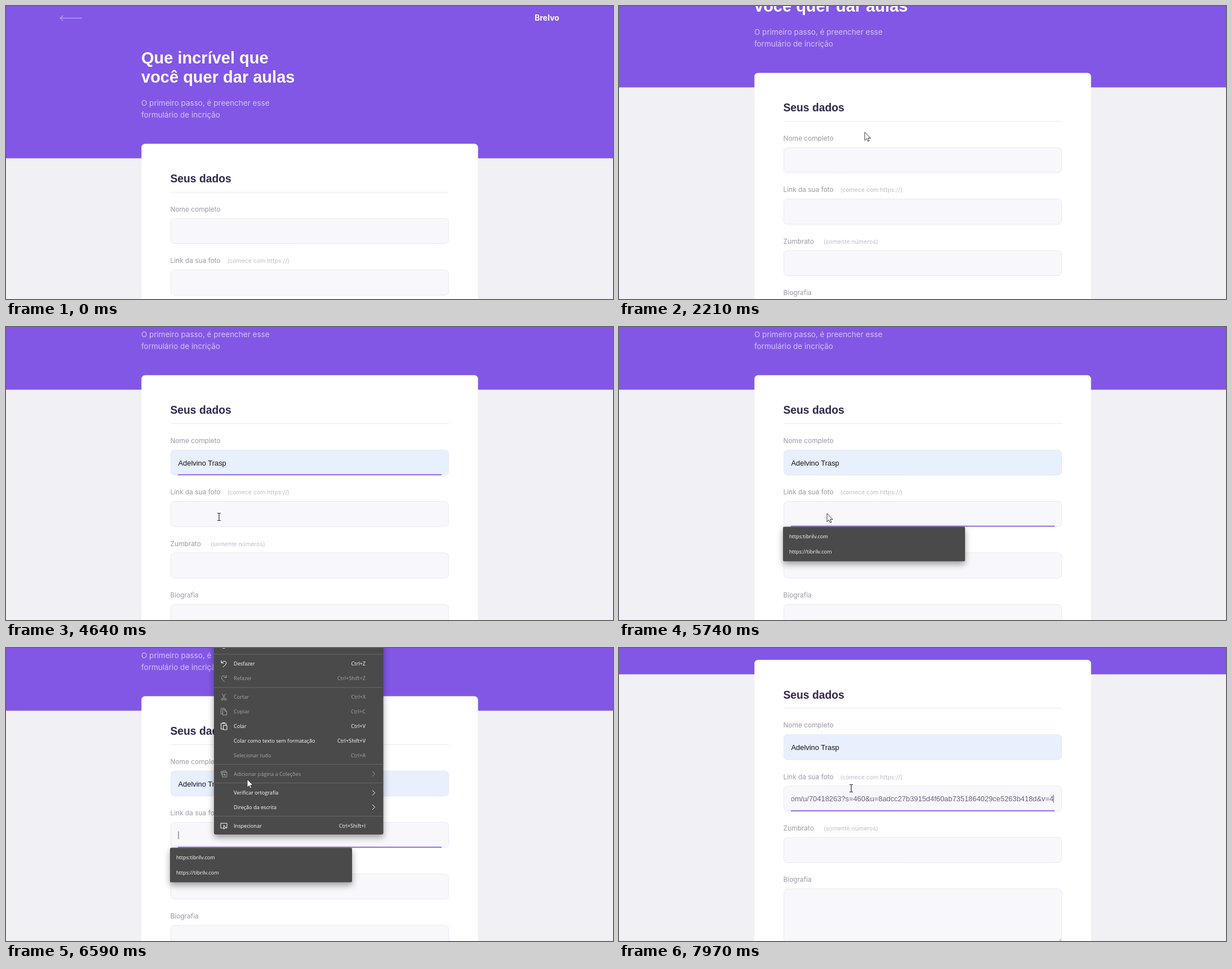
Write an HTML page that moves like this. It is 1077 px wide and 520 px high and loops after 8 s.

```html
<!DOCTYPE html>
<html lang="pt-BR">
<head>
<meta charset="utf-8">
<title>Formulário de inscrição</title>
<style>
  html, body { margin: 0; width: 100%; height: 100%; overflow: hidden; background: #f0f0f5; }
  svg { display: block; width: 100%; height: 100%; }
  text { white-space: pre; }
  .title { font: bold 29px "Liberation Sans", Arial, sans-serif; fill: #fff; }
  .legend { font: bold 19.3px "Liberation Sans", Arial, sans-serif; fill: #32264d; }
  .lead { font: 13.5px Inter, sans-serif; fill: #d4c2ff; }
  .brand { font: bold 14px Inter, sans-serif; fill: #fff; }
  .label { font: 11.9px Inter, sans-serif; fill: #9c98a6; }
  .hint { font: 10.5px Inter, sans-serif; fill: #c1bccc; }
  .value { font: 12.9px "Liberation Sans", Arial, sans-serif; fill: #6a6180; }
  .ui { font: 500 9.15px "Open Sans", "Noto Sans", sans-serif; fill: #fff; }
  .off { opacity: .5; }
  .box { fill: #f8f8fc; stroke: #e6e6f0; stroke-width: .9; }
  .line { fill: none; stroke: #fff; stroke-width: 1; }
  .pop { filter: drop-shadow(0 5px 6px rgba(0, 0, 0, .38)); }
</style>
</head>
<body>
<svg id="stage" viewBox="0 0 1077 520"></svg>
<script>
const LOOP = 8000;
const NAME = 'Adelvino Trasp';
const SCHEME = 'https:', SLASHES = '/'.repeat(2);
const LINK = 'com/u/70418263?s=460&amp;u=8adcc27b3915d4f60ab7351864029ce5263b418d&amp;v=4';
const FIELD_TOP = [377.3, 468.6, 559.9, 651.2];

const text = (cls, x, y, str, extra = '') => `<text class="${cls}" x="${x}" y="${y}" ${extra}>${str}</text>`;
const rect = (x, y, w, h, extra = '') => `<rect x="${x}" y="${y}" width="${w}" height="${h}" ${extra}/>`;

function field(i, label, hint = '', hintX = 0, height = 44.5) {
  const y = FIELD_TOP[i];
  return text('label', 291.5, y - 12.3, label) + text('hint', hintX, y - 12.3, hint) +
    rect(292.4, y, 493, height, `id="box${i}" class="box" rx="6.4"`);
}

const focusLine = i => rect(305, FIELD_TOP[i] + 43.1, 468, 1.7, `id="focus${i}" fill="#8257e5"`);

function dropdown(id, y, height, items) {
  return `<g id="${id}">` + rect(291, y, 323, height, 'class="pop" rx="2" fill="#4a4a4a"') +
    (id === 'names' ? rect(292, y + 3, 321, 27, 'id="nameHover" fill="#616161"') : '') +
    items.map((s, i) => text('ui', 302, y + 20.4 + i * 27.5, s)).join('') + '</g>';
}

// Context menu rows: centre y, label, shortcut ('>' opens a submenu), enabled, icon
const ROWS = [
  [-5, 'Emoji', '', 1, 'M5.5 0A5.5 5.5 0 1 1-5.5 0A5.5 5.5 0 1 1 5.5 0M-2.5 1.5Q0 4 2.5 1.5'],
  [28, 'Desfazer', 'Ctrl+Z', 1, 'M-4.5-6V-1.5H0M-4.5-1.5Q-1-6 2.5-4.5Q6-2 3.5 1L-1.5 6'],
  [54, 'Refazer', 'Ctrl+Shift+Z', 0, 'M4.5-6V-1.5H0M4.5-1.5Q1-6-2.5-4.5Q-6-2-3.5 1L1.5 6'],
  [87, 'Cortar', 'Ctrl+X', 0, 'M-3-6L2 3M3-6L-2 3M-1 4a1.7 1.7 0 1 1-3.4 0a1.7 1.7 0 1 1 3.4 0M4.4 4a1.7 1.7 0 1 1-3.4 0a1.7 1.7 0 1 1 3.4 0'],
  [113, 'Copiar', 'Ctrl+C', 0, 'M-2-4H2L5-1V6H-2ZM2-4V-1H5M-2 4H-5V-6H1L2.5-4'],
  [139, 'Colar', 'Ctrl+V', 1, 'M-1 5H-5V-5H4V-2M-2-5V-6.5H1.5V-5M-1-1.5H5.5V6H-1Z'],
  [165, 'Colar como texto sem formatação', 'Ctrl+Shift+V', 1, ''],
  [190.5, 'Selecionar tudo', 'Ctrl+A', 0, ''],
  [223.5, 'Adicionar página a Coleções', '>', 0, 'M-2.5-3H5.5V5.5H-2.5ZM1.5-1V3.5M-.7 1.2H3.7M-3 3L-5.5-4L3-6L3.6-3'],
  [257, 'Verificar ortografia', '>', 1, ''],
  [282.5, 'Direção da escrita', '>', 1, ''],
  [315.5, 'Inspecionar', 'Ctrl+Shift+I', 1, 'M-1 4H-5.5V-4.5H5.5V3.5H4M0-1V6L2 4H4.5Z']
];

function menuRow([y, label, key, on, icon]) {
  const side = key === '>'
    ? `<path class="line" d="M650 ${y - 4.5}l4.5 4.5l-4.5 4.5"/>`
    : text('ui', 638, y + 3.3, key, 'text-anchor="end"');
  return `<g class="${on ? '' : 'off'}">${text('ui', 404, y + 3.3, label)}${side}
    <path class="line" transform="translate(386.5 ${y})" d="${icon}"/></g>`;
}

const menu = `<g id="menu">${rect(369, -60, 300.5, 391, 'class="pop" rx="3" fill="#4a4a4a"')}
  ${rect(369, 0, 300.5, 26, 'id="rowHover" fill="#616161"')}
  ${[11, 70, 206.5, 239.5, 298.5].map(y => rect(369, y - .5, 300.5, 1, 'fill="#686868"')).join('')}
  ${ROWS.map(menuRow).join('')}</g>`;

document.getElementById('stage').innerHTML = `
  <clipPath id="inside">${rect(305.5, 460, 467, 60)}</clipPath>
  ${rect(0, 0, 1077, 520, 'fill="#f0f0f5"')}
  <g id="page">
    ${rect(0, 0, 1077, 270.3, 'fill="#8257e5"')}
    <path d="M134.5 21.5H96.5M101 17l-4.7 4.5l4.7 4.5" fill="none" stroke="#b79bf3" stroke-width="1.5"/>
    ${text('brand', 938, 25.5, 'Brelvo')}
    ${text('title', 240, 102, 'Que incrível que')}
    ${text('title', 240, 136, 'você quer dar aulas')}
    ${text('lead', 240, 177, 'O primeiro passo, é preencher esse')}
    ${text('lead', 240, 198, 'formulário de incrição')}
    ${rect(240.3, 244.6, 597.2, 900, 'rx="6.4" fill="#fff"')}
    ${text('legend', 291.5, 313.3, 'Seus dados')}
    ${rect(292, 330, 494, .9, 'fill="#e6e6f0"')}
    ${field(0, 'Nome completo')}
    ${field(1, 'Link da sua foto', `(comece com ${SCHEME}${SLASHES})`, 392.5)}
    ${field(2, 'Zumbrato', '(somente números)', 363)}
    ${field(3, 'Biografia', '', 0, 95)}
    <path d="M779.5 745l5-5M782.5 745l2-2" stroke="#777" stroke-width=".8"/>
    ${focusLine(0)}${focusLine(1)}
    ${text('value', 305.5, 404.6, NAME, 'id="name" style="fill:#111"')}
    <g id="link" clip-path="url(#inside)">${text('value', 771, 495.9, LINK, 'text-anchor="end"')}</g>
    ${rect(0, 0, 1, 14, 'id="caret" fill="#5a5170"')}
  </g>
  ${dropdown('names', 263.5, 33.5, [NAME])}
  ${dropdown('links', 354.5, 61.3, [SCHEME + 'tibrilv.com', SCHEME + SLASHES + 'tibrilv.com'])}
  ${menu}
  <path id="arrow" d="M0 0V14.5L3.4 11.3L5.7 16.3L7.9 15.3L5.7 10.5H10.2Z" fill="#fff" stroke="#222" stroke-width=".9"/>
  <path id="beam" d="M-3-6.5H-.8L0-6L.8-6.5H3M0-6V6M-3 6.5H-.8L0 6L.8 6.5H3" fill="none" stroke="#222" stroke-width="1.1"/>`;

const el = {};
document.querySelectorAll('[id]').forEach(n => el[n.id] = n);
const show = (id, on) => el[id].setAttribute('visibility', on ? 'visible' : 'hidden');
const move = (id, x, y) => el[id].setAttribute('transform', `translate(${x} ${y})`);
const within = (t, a, b) => t >= a && t < b;

// [time, scroll offset]
const SCROLL = [[0, 0], [1840, 46], [1920, 79.5], [2210, 125.9], [2290, 159], [7890, 190], [7970, 223.6]];

// [time, x, y, pointer shape]
const POINTER = [
  [630, 642, 408, 'arrow'], [780, 560, 340, 'arrow'], [930, 474, 260, 'arrow'], [1080, 436, 224, 'arrow'],
  [2655, 436, 224, 'arrow'], [2660, 431, 240, 'beam'], [2720, 428, 250, 'beam'],
  [2945, 428, 250, 'beam'], [2950, 420, 249, 'beam'], [3050, 424, 254, 'beam'],
  [3725, 424, 254, 'beam'], [3735, 415, 264, 'arrow'], [3960, 371, 275, 'arrow'],
  [4170, 371, 275, 'arrow'], [4320, 374, 300, 'arrow'], [4400, 377, 325, 'beam'], [4470, 378, 335, 'beam'],
  [4640, 378, 337, 'beam'], [4800, 378, 337, 'beam'], [5030, 373, 331, 'beam'],
  [5585, 373, 331, 'beam'], [5590, 364, 331, 'beam'], [5735, 364, 331, 'beam'],
  [5740, 369, 331, 'arrow'], [6305, 369, 331, 'arrow'], [6310, 377, 317, 'arrow'],
  [6450, 377, 317, 'arrow'], [6460, 395, 290, 'arrow'], [6590, 428, 233, 'arrow'], [6660, 428, 233, 'arrow'],
  [6960, 433, 160, 'arrow'], [7180, 431, 137, 'arrow'], [7275, 431, 137, 'arrow'], [7280, 438, 137, 'arrow'],
  [7430, 442, 146, 'beam'], [7500, 442, 146, 'beam'], [7890, 412, 249, 'beam'], [LOOP, 412, 249, 'beam']
];

function pointerAt(t) {
  const i = POINTER.findIndex(k => k[0] > t) - 1;
  if (i < 0) return null;
  const [t0, x0, y0, shape] = POINTER[i], [t1, x1, y1] = POINTER[i + 1];
  const p = (t - t0) / (t1 - t0);
  return { x: x0 + (x1 - x0) * p, y: y0 + (y1 - y0) * p, shape };
}

function draw(t) {
  const scroll = SCROLL.filter(s => s[0] <= t).pop()[1];
  move('page', 0, -scroll);

  const pasted = t >= 7510;
  const named = t >= 3880;
  show('focus0', within(t, 3270, 4800));
  show('focus1', t >= 4800);
  show('name', named);
  show('link', pasted);
  el.box0.style.fill = named ? '#e8f0fe' : '#f8f8fc';
  show('names', within(t, 3270, 4100));
  el.nameHover.style.display = within(t, 3810, 4100) ? '' : 'none';
  show('links', within(t, 4870, 7510));

  const onName = within(t, 3270, 3770) || within(t, 4100, 4600);
  const onLink = within(t, 4800, 5590) || within(t, 6140, 6660) || t >= 7180;
  show('caret', onName || onLink);
  if (onName) move('caret', t < 4000 ? 305.5 : 395, 393);
  else move('caret', pasted ? 770.5 : 305.5, 484.3);

  const open = within(t, 5920, 7430);
  el.menu.style.display = open ? '' : 'none';
  el.menu.style.opacity = t < 5990 ? .6 : 1;

  const p = pointerAt(t);
  for (const id of ['arrow', 'beam']) show(id, p && p.shape === id);
  if (p) move(p.shape, p.x, p.y);

  const row = open && t >= 6460 && ROWS.find(r => r[3] && Math.abs(r[0] - p.y) < 13);
  el.rowHover.style.display = row ? '' : 'none';
  if (row) el.rowHover.setAttribute('y', row[0] - 13);
}

const start = performance.now();
function tick() {
  draw((performance.now() - start) % LOOP);
  requestAnimationFrame(tick);
}
tick();
</script>
</body>
</html>
```
